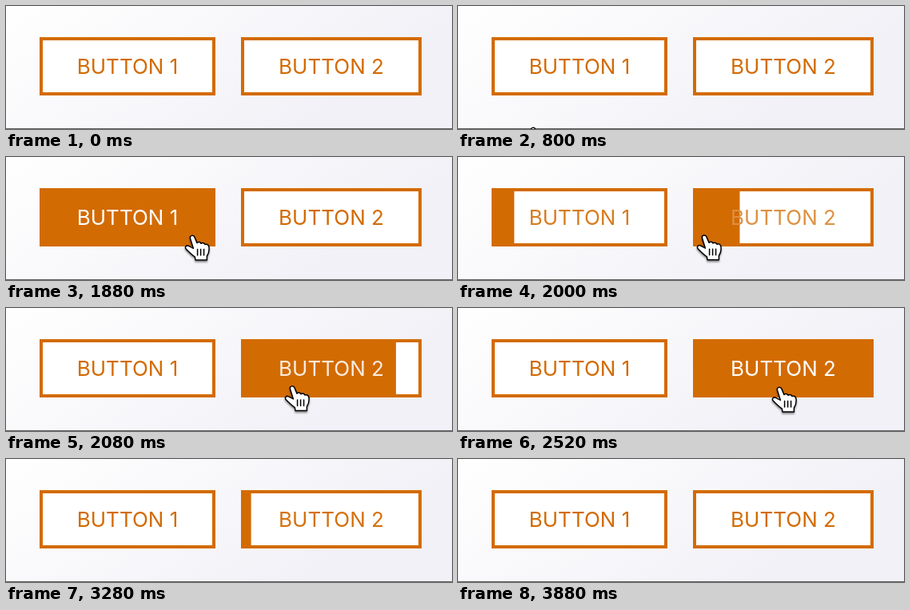
Recreate the animation shown at these times as an HTML page. Size 558x154 px, loop 4000 ms.

```html
<!DOCTYPE html>
<html lang="en">
<head>
<meta charset="utf-8">
<title>Button hover</title>
<style>
  html, body { margin: 0; width: 100%; height: 100%; overflow: hidden; }
  svg { display: block; width: 558px; height: 154px; }
  text { font: 400 26px Inter, Lato, sans-serif; text-anchor: middle; }
  #hand { filter: drop-shadow(0 2px 1px rgba(0, 0, 0, .45)); }
</style>
</head>
<body>
<svg viewBox="0 0 558 154">
  <defs>
    <linearGradient id="bg" gradientUnits="userSpaceOnUse" x1="120" y1="-60" x2="300" y2="200">
      <stop offset="0" stop-color="#fefefe"/>
      <stop offset="1" stop-color="#f2f1f7"/>
    </linearGradient>
  </defs>
  <rect width="558" height="154" fill="url(#bg)"/>
  <rect y="153" width="558" height="1" fill="#626262"/>
  <g id="buttons"></g>
  <g id="hand" stroke="#000" stroke-width="1.5" stroke-linecap="round" stroke-linejoin="round">
    <path fill="#fff" d="M-2.6 3.6C-3.2-.2 1.8-.8 3 2.4L6 9.6C7.4 7.8 10.4 8.2 11 10.3
      C12.8 9 15.4 9.6 16 11.6C18 10.6 20.2 11.4 20.8 14C21.6 18 20.8 22.4 18.4 26V31H4
      L3.4 27.2C-.4 24.6-4.6 20.4-7.9 17C-9.7 14.6-7.2 11.9-4.4 13.3L1.4 16.4Z"/>
    <path d="M6.6 17.5V25M10.6 17.5V25M14.6 17.5V25"/>
  </g>
</svg>
<script>
const ORANGE = [211, 107, 3];
const LOOP = 4000, STEP = 40;
const hand = document.getElementById('hand');

// Fill times: hover starts, is full, starts to retract, is empty.
const buttons = [
  { label: 'BUTTON 1', x: 42, w: 220, times: [920, 1120, 1880, 2080] },
  { label: 'BUTTON 2', x: 294, w: 226, times: [1964, 2164, 3160, 3320] },
];

const easeIn = p => p * p;
const easeOut = p => 1 - (1 - p) ** 2;
const linear = p => p;

// Pointer legs: start time, end time, from, to, easing.
const legs = [
  [800, 1120, [94, 152], [165, 96], easeOut],
  [1680, 1880, [165, 96], [233, 98], easeIn],
  [1880, 2080, [233, 98], [358, 97.5], linear],
  [2080, 2200, [358, 97.5], [402, 99], easeOut],
  [3080, 3160, [402, 99], [402, 160], easeIn],
];

const progress = (t, a, b) => Math.min(1, Math.max(0, (t - a) / (b - a)));
const mix = (a, b, p) => a + (b - a) * p;

// The CSS "ease" curve, solved by bisection.
function ease(p) {
  const bezier = (a, b, s) => 3 * a * s * (1 - s) ** 2 + 3 * b * s * s * (1 - s) + s ** 3;
  let lo = 0, hi = 1;
  for (let i = 0; i < 24; i++) {
    const mid = (lo + hi) / 2;
    if (bezier(.25, .25, mid) < p) lo = mid; else hi = mid;
  }
  return bezier(.1, 1, hi);
}

function add(parent, tag, attrs) {
  const el = document.createElementNS('http://www.w3.org/2000/svg', tag);
  for (const key in attrs) el.setAttribute(key, attrs[key]);
  return parent.appendChild(el);
}

const group = document.getElementById('buttons');
for (const b of buttons) {
  const fill = `rgb(${ORANGE})`;
  add(group, 'rect', { x: b.x, y: 39, width: b.w, height: 73, fill });
  add(group, 'rect', { x: b.x + 4, y: 43, width: b.w - 8, height: 65, fill: '#fff' });
  b.fill = add(group, 'rect', { x: b.x + 4, y: 43, width: 0, height: 65, fill });
  b.text = add(group, 'text', { x: b.x + b.w / 2, y: 85 });
  b.text.textContent = b.label;
}

function draw(t) {
  for (const b of buttons) {
    const [on, full, off, empty] = b.times;
    const p = ease(progress(t, on, full)) - ease(progress(t, off, empty));
    b.fill.setAttribute('width', Math.max(0, p * (b.w - 8)));
    b.text.setAttribute('fill', `rgb(${ORANGE.map(c => Math.round(mix(c, 255, p)))})`);
  }
  const visible = t >= 800 && t < 3160;
  hand.style.display = visible ? '' : 'none';
  if (!visible) return;
  const [start, end, from, to, curve] = legs.filter(leg => leg[0] <= t).pop();
  const p = curve(progress(t, start, end));
  hand.setAttribute('transform', `translate(${mix(from[0], to[0], p)} ${mix(from[1], to[1], p)})`);
}

let origin;
function tick(now) {
  origin ??= now;
  draw(Math.floor((now - origin) % LOOP / STEP) * STEP);
  requestAnimationFrame(tick);
}
draw(0);
requestAnimationFrame(tick);
</script>
</body>
</html>
```
